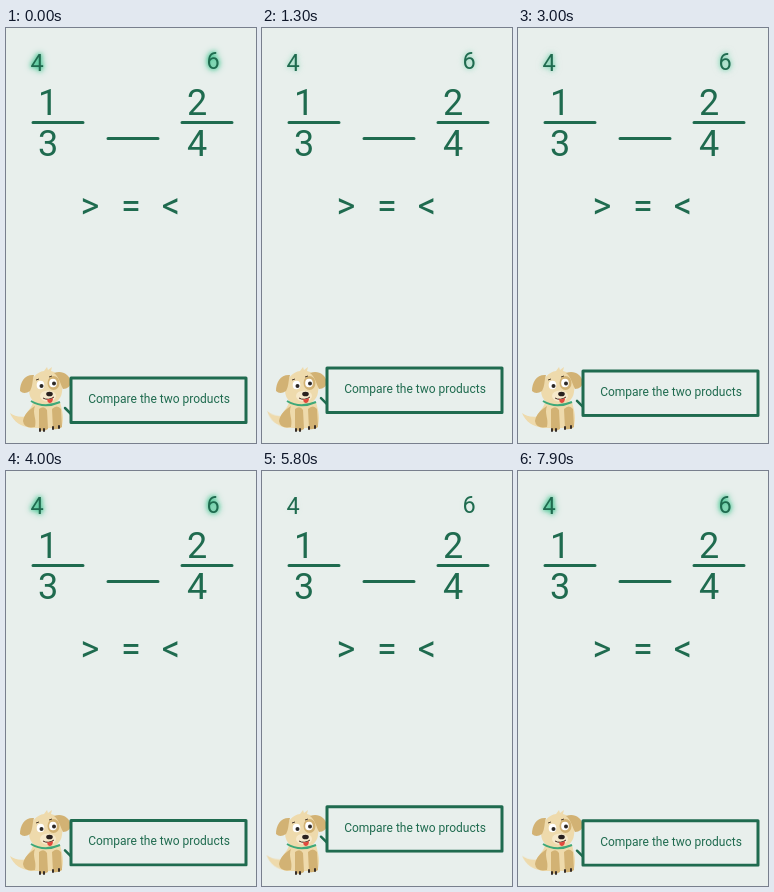
An HTML page for the animation above (8000 ms loop, 250 px wide and 415 px high).

```html
<!DOCTYPE html>
<html lang="en">
<head>
<meta charset="utf-8">
<title>Compare fractions</title>
<style>
  html, body { margin: 0; width: 100%; height: 100%; overflow: hidden; background: #e8efec; }
  svg { display: block; width: 250px; height: 415px; }
  text { font-family: Roboto, Arial, sans-serif; fill: #1f6b4f; text-anchor: middle; }
  .big { font-size: 36px; }
  .small { font-size: 23.5px; }
  .label { font-size: 12px; }
  .ink { fill: none; stroke: #1f6b4f; stroke-width: 3; stroke-linecap: round; stroke-linejoin: round; }
  .cream { fill: #eedaac; }
  .tan { fill: #d2b274; }

  .bubble { animation: bob 8s linear infinite; }
  .glow { animation: glow 8s linear infinite; }
  .six { animation: drop 8s step-end infinite; }
  .tail { transform-origin: 24px 395px; animation: wag .5s ease-in-out infinite alternate; }

  @keyframes bob {
    0%, 49.1%, 98.25% { transform: none; }
    24.55%, 73.7% { transform: translateY(-15px); }
    100% { transform: translateY(-1px); }
  }
  @keyframes glow {
    0%, 49.1%, 98.25% { filter: drop-shadow(0 0 2px #2fbf86) drop-shadow(0 0 3px #5fcda0); }
    24.55%, 73.7% { filter: drop-shadow(0 0 2px #2fbf8600) drop-shadow(0 0 3px #5fcda000); }
    100% { filter: drop-shadow(0 0 2px #2fbf86f0) drop-shadow(0 0 3px #5fcda0f0); }
  }
  @keyframes drop {
    0% { transform: none; }
    29% { transform: translateY(1px); }
  }
  @keyframes wag { to { transform: rotate(9deg); } }
</style>
</head>
<body>
<svg viewBox="0 0 250 415">
  <g class="glow"><text class="small" x="31" y="43">4</text></g>
  <g class="six"><g class="glow"><text class="small" x="207" y="40.5">6</text></g></g>

  <g class="big">
    <text x="42" y="86.5">1</text>
    <text x="42" y="127.5">3</text>
    <text x="191" y="86.5">2</text>
    <text x="191" y="127.5">4</text>
    <text x="84" y="190">&gt;</text>
    <text x="125" y="190">=</text>
    <text x="165" y="190">&lt;</text>
  </g>
  <path class="ink" d="M27 94.5H77M176 94.5H226M102 110.5H152"/>

  <g class="dog">
    <path class="tail cream" d="M27 399C17 400 8 395 4 385C9 389 16 390 27 387Z"/>
    <path class="cream" d="M27 374C26 381 17 386 17 394Q18 400 27 400H55C59 391 56 382 54 374Z"/>
    <path class="tan" d="M17 393C18 386 24 381 29 378C26 386 31 390 29 399Q18 401 17 393Z"/>
    <path class="tan" d="M33 381Q38 377 41 382L42 401Q38 404 33 402ZM46 381Q51 376 55 381L56 399Q52 402 47 401Z"/>
    <path d="M34 401v2M38 401v2M47 399v2M53 398v2" stroke="#372e28" stroke-width="2" stroke-linecap="round"/>
    <path class="cream" d="M23 362C24 350 31 344 38 343L41 339L42 342L46 339L45 343C54 345 58 354 56 364C55 373 47 377 40 377C31 377 23 373 23 362Z"/>
    <path class="tan" d="M28 347C19 346 14 354 14 363Q18 367 24 363C27 358 26 353 28 347Z"/>
    <path class="tan" d="M48 345C56 342 63 346 65 354Q64 361 57 361C54 355 53 349 48 345Z"/>
    <ellipse class="tan" cx="47.5" cy="355" rx="6" ry="7"/>
    <ellipse cx="34.5" cy="357" rx="3.8" ry="4.3" fill="#fff"/>
    <ellipse cx="47" cy="355" rx="3.8" ry="4.3" fill="#fff"/>
    <circle cx="35.5" cy="358" r="2" fill="#2c2826"/>
    <circle cx="48" cy="355.5" r="2" fill="#2c2826"/>
    <path d="M30 352l3-1M43 349l3-1" stroke="#4b3b2b" fill="none"/>
    <ellipse cx="42" cy="368" rx="8" ry="5.5" fill="#f6e9cb"/>
    <ellipse cx="43.5" cy="366" rx="3.3" ry="2.3" fill="#29211f"/>
    <path d="M37 370Q42 373 48 369" stroke="#4b3029" fill="none"/>
    <path d="M41 371Q44 372 47 370Q47 375 43.5 375Q41 374 41 371Z" fill="#e2493d"/>
    <path d="M25 373Q38 381 54 374" stroke="#3ea878" stroke-width="2" fill="none"/>
  </g>

  <g class="bubble">
    <path class="ink" style="stroke-width:2.5" d="M59 380L65 386"/>
    <rect class="ink" x="65" y="350" width="175" height="44.5" style="fill:#e8efec"/>
    <text class="label" x="153" y="375">Compare the two products</text>
  </g>
</svg>
</body>
</html>
```
